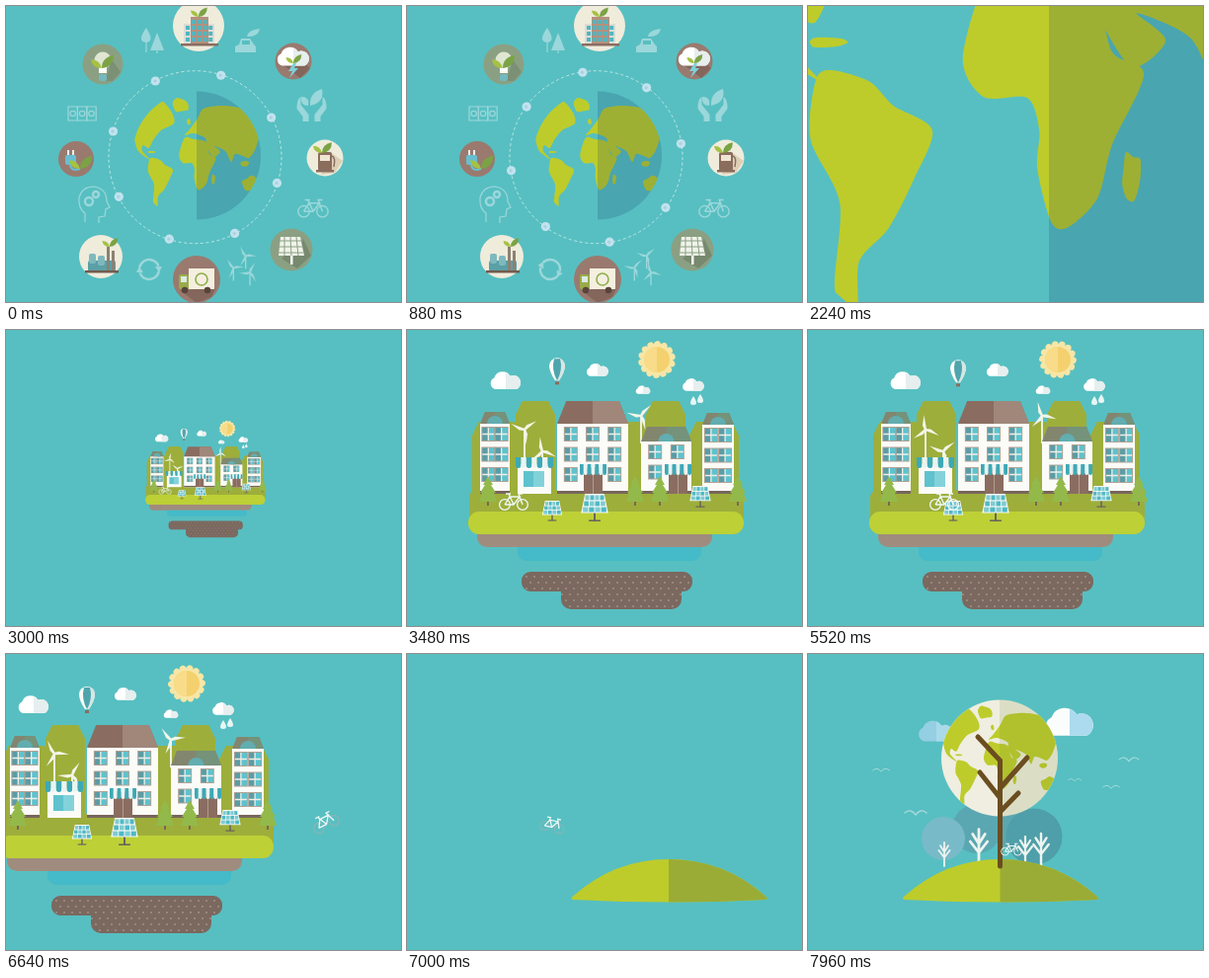
An HTML page with a canvas that plays this animation: 400 px wide and 300 px high, repeating every 8000 ms.

```html
<!DOCTYPE html>
<html lang="en">
<head>
<meta charset="utf-8">
<title>Green planet</title>
<style>
html, body { margin: 0; width: 100%; height: 100%; overflow: hidden; background: #57bfc1; }
canvas { display: block; width: 400px; height: 300px; }
</style>
</head>
<body>
<canvas id="stage" width="400" height="300"></canvas>
<script>
const ctx = document.getElementById('stage').getContext('2d');
const LOOP = 8000, TAU = Math.PI * 2;
const SKY = '#57bfc1', LAND = '#bdcc2b', OLIVE = '#9dae3b', CREAM = '#f0ecdc', WHITE = '#fbfbf8',
  BROWN = '#8a6d60', MAUVE = '#9a7a6f', SAGE = '#8ba083', TEAL = '#4fb6c2', PALE = '#9bd7db', BARK = '#6b4d20';

// ---------- helpers ----------
const clamp = v => Math.max(0, Math.min(1, v));
const span = (t, from, length) => clamp((t - from) / length);
const easeSine = u => (1 - Math.cos(Math.PI * u)) / 2;
const easeCubic = u => u < .5 ? 4 * u ** 3 : 1 - 4 * (1 - u) ** 3;
const easeOut = u => 1 - (1 - u) ** 3;
const noise = n => { const v = Math.sin(n * 12.9898) * 43758.5453; return v - Math.floor(v); };
const times = (n, draw) => { for (let i = 0; i < n; i++) draw(i); };

function fill(d, color) { ctx.fillStyle = color; ctx.fill(new Path2D(d)); }
function line(d, color = PALE, width = 1.2) {
  ctx.strokeStyle = color; ctx.lineWidth = width; ctx.stroke(new Path2D(d));
}
function rect(x, y, w, h, color, radius = 0) {
  ctx.fillStyle = color; ctx.beginPath(); ctx.roundRect(x, y, w, h, radius); ctx.fill();
}
function disc(x, y, r, color, from = 0, to = TAU) {
  ctx.fillStyle = color; ctx.beginPath(); ctx.arc(x, y, r, from, to); ctx.fill();
}
function ring(x, y, r, color = PALE, width = 1.2, from = 0, to = TAU) {
  ctx.strokeStyle = color; ctx.lineWidth = width;
  ctx.beginPath(); ctx.arc(x, y, r, from, to); ctx.stroke();
}
function at(x, y, scale, angle, draw) {
  ctx.save(); ctx.translate(x, y); ctx.rotate(angle); ctx.scale(scale, scale); draw(); ctx.restore();
}
// Scales a scene about a fixed point.
const zoom = (x, y, scale, draw) => at(x, y, scale, 0, () => { ctx.translate(-x, -y); draw(); });

// ---------- globe ----------
// Closed smooth curve through a few key points.
function coast(...p) {
  const n = p.length / 2, shape = new Path2D();
  const get = (i, axis) => p[(i + n) % n * 2 + axis];
  shape.moveTo(p[0], p[1]);
  times(n, i => {
    const c = [0, 1].map(a => [
      get(i, a) + (get(i + 1, a) - get(i - 1, a)) / 7,
      get(i + 1, a) - (get(i + 2, a) - get(i, a)) / 7,
      get(i + 1, a)]);
    shape.bezierCurveTo(c[0][0], c[1][0], c[0][1], c[1][1], c[0][2], c[1][2]);
  });
  return shape;
}
function island(x, y, rx, ry) {
  const p = [];
  times(9, i => {
    const k = .8 + .4 * noise(x + i);
    p.push(x + rx * k * Math.cos(i * TAU / 9), y + ry * k * Math.sin(i * TAU / 9));
  });
  return coast(...p);
}
const america = coast(131, 117, 140, 101, 157, 96, 168, 108, 170, 119, 157, 126, 149, 136, 144.7, 144, 139, 141, 138, 147, 146, 156, 134, 147, 130, 133);
const southAmerica = coast(145, 156, 148, 153.7, 156, 156, 161, 161, 169, 166, 165.3, 176, 160, 186.3, 154, 193, 153.5, 203, 149, 199, 150, 181, 144, 168);
const africa = coast(181, 133.5, 190, 135, 202, 137.5, 206, 150, 212.5, 154.5, 206, 169, 203, 180, 197, 186, 193.5, 185, 190.6, 174, 191, 166, 188.5, 159.4, 179.5, 159.2, 175.3, 151);
const eurasia = coast(181, 131, 186, 125, 194, 114, 200, 104, 218, 101, 238, 104, 252, 117, 256, 132, 252, 146, 246, 154, 240, 152, 232, 150, 228, 158, 222, 147, 211, 142, 217, 147.6, 210, 153, 203, 142, 202, 134, 190, 129);
const continents = [america, southAmerica, africa, eurasia,
  island(177, 100, 8, 7), island(147, 148, 4, 1), island(210, 175.5, 2, 4.7), island(185, 117, 2, 3),
  island(242, 160, 4, 3), island(247, 180, 8, 7)];

function drawGlobe(shade, base) {
  ctx.save();
  ctx.beginPath(); ctx.arc(193, 151.5, 65, 0, TAU); ctx.clip();
  if (base) rect(128, 86, 130, 131, base);
  ctx.fillStyle = LAND;
  continents.forEach(shape => ctx.fill(shape));
  rect(193, 86, 66, 131, shade);
  ctx.restore();
}

// ---------- shared parts ----------
function leaf(x, y, size) {
  at(x, y, size, 0, () => {
    fill('M0 0Q-2 -8 -10 -8Q-9 0 0 0Z', '#a5c244');
    fill('M0 0Q0 -10 11 -12Q11 -1 0 0Z', '#7ba345');
  });
}
function bike(x, y, scale, angle, color = '#eef8f6', wheels = color) {
  at(x, y, scale, angle, () => {
    for (const side of [-9, 9]) ring(side, 3, 5.4, wheels, 1.3);
    line('M-9 3L-4 -5H6L0 3H-9M0 3L-5 -8M-8 -8H-3M9 3L5 -8H9', color, 1.4);
  });
}
function halved(d, left, right, x = 0) {
  fill(d, left);
  ctx.save(); ctx.beginPath(); ctx.rect(x, -300, 400, 600); ctx.clip(); fill(d, right); ctx.restore();
}
function cloud(x, y, s, left = '#fff', right = '#e6eeee') {
  at(x, y, s, 0, () => halved('M-12 9A7 7 0 0 1 -13 -4A10 10 0 0 1 5 -6A8 8 0 0 1 12 9Z', left, right));
}
function turbine(x, y, pole, length, angle, color) {
  rect(x - length / 16, y, length / 8, pole, color);
  times(3, i => at(x, y, length / 13, angle + i * TAU / 3, () => fill('M0 -1L4 -2.2 13 0 0 1Z', color)));
}

// ---------- icons around the globe ----------
function badge(x, y, r, color, draw) {
  at(x, y, 1, 0, () => { disc(0, 0, r, color); draw(); });
}
function badges() {
  badge(195, 20, 26, CREAM, () => {
    rect(-15, -2, 31, 21, '#dcdcd5'); rect(-8, -9, 18, 28, '#b3917d');
    times(4, row => times(5, col => row + col % 4 && rect(-13 + col * 5.8, -6 + row * 6, 4, 4, TEAL)));
    rect(-18, 18, 38, 2.5, BROWN); leaf(0, -9, .8);
  });
  badge(98, 59, 20.5, SAGE, () => {
    fill('M5 10L9 -5 18 8 10 17H0Z', '#7b9074');
    disc(0, -4, 8.5, '#dfe6d2'); rect(-4, 3, 8, 6, WHITE); rect(-4, 10, 8, 7, '#74b9bf', 2); leaf(-1, 4, 1.1);
  });
  badge(291, 56, 18.5, MAUVE, () => {
    fill('M-10 4L12 3 17 7 7 17Z', '#84665c');
    cloud(0, -4, .95); leaf(0, 2, .75);
    fill('M0 2L-5 10H-1L-4 17 5 7H1L3 2Z', '#7ed0d8');
  });
  badge(323, 154, 18.5, CREAM, () => {
    fill('M4 -7L18 3 10 15 -4 17Z', '#ddd0b6');
    rect(-7, -6, 14, 19, '#8b6d5c', 2); rect(-5, -3, 10, 6, '#efe5d2');
    rect(-9, 12, 18, 2.5, BROWN); line('M7 -2Q11 -1 9 9', BROWN, 1.5); leaf(-3, -5, .9);
  });
  badge(289, 247, 21.5, SAGE, () => {
    fill('M-10 9L12 -11 20 6 6 19Z', '#77896f');
    fill('M-11 -13H9L13 6H-13Z', '#f0f3ea');
    times(3, i => line(`M${i * 6 - 7} -13L${i * 7 - 7} 6M-13 ${i * 6 - 9}H12`, '#8ba083', 1));
    rect(-1, 6, 2.5, 9, WHITE);
  });
  badge(193, 277, 24, MAUVE, () => {
    fill('M-17 11L19 9 15 18 0 24Z', '#84665c');
    rect(-18, -5, 10, 15, '#9aac4a', 2); rect(-16, -3, 6, 6, '#dcebe4');
    rect(-8, -11, 26, 21, '#f4efdf'); ring(5, 0, 6, '#8fae4c', 1.6);
    for (const x of [-12, 11]) disc(x, 11, 3.2, '#57443b');
  });
  badge(96, 254, 22, CREAM, () => {
    rect(-13, 4, 28, 11, '#5aa0a6', 2);
    times(2, i => rect(-12 + i * 9, -3 + i * 2, 7, 10, '#7fb9be', 2));
    times(2, i => rect(6 + i * 5, -10 + i * 4, 3, 25 - i * 4, '#8d8173'));
    rect(-16, 14, 34, 2.5, '#735b4e'); leaf(9, -10, .75);
  });
  badge(71, 155, 18, MAUVE, () => {
    rect(-11, -4, 11, 10, '#67bfd0', 2); line('M-8 -4V-9M-3 -4V-9', '#e6f1ef', 2);
    line('M-6 6Q-5 13 4 10', '#67bfd0', 2); leaf(4, 10, 1.1);
  });
}
function outlines(t) {
  fill('M142 22Q132 36 142 37Q151 36 142 22ZM153 27L146 45H160Z', PALE); line('M142 35V47M153 44V48');
  fill('M232 47V41L236 39 238 33H247L251 39 253 41V47ZM244 31Q245 24 257 23Q255 32 244 31Z', PALE);
  rect(239, 35, 8, 4, SKY);
  times(3, i => { line(`M${63 + i * 9.4} 102h9.4v14h-9.4Z`); ring(67.7 + i * 9.4, 109, 2.7); });
  fill('M308 101Q307 88 320 84Q323 98 308 101ZM306 101Q298 101 299 92Q308 92 306 101Z', PALE);
  for (const side of [-1, 1]) {
    ctx.save(); ctx.translate(309.5, 104); ctx.scale(side, 1);
    fill('M3 13V6L11 -4V-12Q15 -10 15 0L9 8V13Z', PALE); ctx.restore();
  }
  bike(311, 205, 1.05, 0, PALE);
  line('M80 219V210Q73 205 74 194Q77 183 89 183Q102 185 102 198L105 204 101 206 100 213 94 214V220');
  ring(84, 198, 4, PALE, 2.4); ring(91, 191, 3, PALE, 2.4);
  times(3, i => {
    const a = -1.3 + i * TAU / 3;
    turbine(240 + 10 * Math.cos(a), 263 + 10 * Math.sin(a), 13, 11, t / 650 + i, PALE);
  });
  times(2, i => at(145, 267, 1, t / 1600 + i * Math.PI, () => {
    ring(0, 0, 10, PALE, 2.4, .2, 2.8); fill('M-13 3H-6L-10 -3Z', PALE);
  }));
}
function globeScene(t) {
  const fade = 1 - span(t, 1720, 360);
  const scale = Math.exp(3.1 * span(t, 1720, 800) ** 1.55);
  zoom(180, 176.3, scale, () => drawGlobe('rgba(8,50,95,.176)'));
  if (!fade) return;
  ctx.globalAlpha = fade;
  ctx.setLineDash([3, 2.6]); ring(191.5, 153.2, 87.5, '#bfe6e7', 1); ctx.setLineDash([]);
  times(8, i => {
    const a = (-72.5 + i * 45 + t * .021) * Math.PI / 180;
    const x = 191.5 + 87 * Math.cos(a), y = 153.2 + 87 * Math.sin(a);
    disc(x, y, 4.6, '#c1e2ee'); disc(x - .5, y, 1.5, '#a5d2e0');
  });
  outlines(t); badges();
  ctx.globalAlpha = 1;
}

// ---------- floating town ----------
function pane(x, y) {
  rect(x - 1, y - 1, 14, 15, '#b0a192');
  rect(x, y, 6, 13, '#5b9ca6'); rect(x + 6, y, 6, 13, '#5cc3ce');
  line(`M${x + 6} ${y}v13M${x} ${y + 6.5}h12`, '#f0eee6', 1.3);
}
function house(x, y, w, cols, rows) {
  rect(x, y, w, 166 - y, WHITE); rect(x, 163, w, 3, '#78655b');
  const step = w / (cols + .25);
  times(rows, r => times(cols, c => pane(x + (w - step * (cols - 1)) / 2 - 6 + c * step, y + 5 + r * 20.5)));
}
function roof(x, y, w, h, left, right, dome) {
  const inset = h / 2.5;
  halved(`M${x} ${y}l${inset} ${-h}h${w - 2 * inset}l${inset} ${h}Z`, left, right, x + w / 2);
  if (dome) disc(x + w / 2, y, 8, '#62adb0', Math.PI, TAU);
}
function awning(x, y, w) {
  times(7, i => rect(x + i * w / 7, y, w / 7, 11, i % 2 ? '#eaf4f2' : '#3da9b6', [0, 0, 3, 3]));
}
function entrance(x) {
  rect(x + 4, 142, 19, 24, BROWN); rect(x + 13, 146, 1, 20, '#b29c8c'); awning(x, 136, 27);
}
function pine(x) {
  rect(x - 1, 172, 2, 6, '#7a6755');
  fill(`M${x} 148l5 9h-2l5 8h-2l3 9h-18l3 -9h-2l5 -8h-2Z`, '#93b94b');
}
function panel(x, y, s) {
  at(x, y, s, 0, () => {
    rect(-1, 18, 2, 10, '#6b625d'); rect(-6, 27, 12, 1.6, '#6b625d');
    fill('M-10 0H10L14 20H-14Z', '#f6f8f5');
    times(3, r => times(4, c => {
      const w = 4.1 + r * .6;
      rect((c - 2) * (w + 1) + .5, 1.5 + r * 6.2, w, 5, (r + c) % 2 ? '#4fb9c5' : '#7fcbd3');
    }));
  });
}
function soil() {
  rect(71, 200, 238, 20, '#a08c7e', [0, 0, 10, 10]);
  rect(112, 220, 186, 14, '#45bac8', [0, 0, 9, 9]);
  ctx.save();
  ctx.beginPath(); ctx.roundRect(116, 245, 173, 20, 9); ctx.roundRect(156, 258, 122, 25, [0, 0, 10, 10]);
  ctx.fillStyle = '#7b685f'; ctx.fill(); ctx.clip();
  times(6, row => times(22, col => disc(121 + col * 8 + row % 2 * 4, 250 + row * 6, 1, '#a19187')));
  ctx.restore();
}
function sun(t) {
  at(253, 30, 1, t / 3000, () => times(14, i => {
    const a = i * TAU / 14;
    disc(15.5 * Math.cos(a), 15.5 * Math.sin(a), 3.4, '#f7e6a6');
  }));
  disc(253, 30, 16, '#f7e6a6'); disc(253, 30, 13, '#f4d16e');
  disc(253, 30, 13, '#f8dc8a', TAU / 4, TAU * 3 / 4);
}
function balloon(t) {
  at(152, 39 - 3 * Math.cos((t - 4240) / 2400 * Math.PI), 1, 0, () => {
    halved('M-2 14Q-8 5 -8 -1A8 8 0 0 1 8 -1Q8 5 2 14Z', WHITE, '#d5e6e4');
    fill('M0 14Q-6 3 -3 -8H3Q6 3 0 14Z', '#4fa5ad');
    rect(-2, 15, 4, 3, BROWN);
  });
}
function town(t) {
  times(6, i => {
    const tall = i % 3 === 1, w = tall ? 40 : 50;
    halved(`M${66 + i * 44} 186V${tall ? 86 : 107}l7 -14h${w - 14}l7 14V186Z`, OLIVE, OLIVE);
  });
  soil();
  rect(63, 162, 278, 36, OLIVE, 8);
  rect(62, 184, 279, 23, '#bdd036', 11);

  const spin = t / 650;
  turbine(119, 101, 30, 15, spin + .3, '#f3f5e8');
  turbine(137, 123, 20, 15, spin + 1.3, '#f3f5e8');
  turbine(237, 87, 28, 15, spin + 2.2, '#f3f5e8');

  house(74, 94, 30, 2, 3); roof(74, 95, 30, 12, '#83866f', '#75927a', true);
  house(152, 94, 72, 3, 3); roof(152, 95, 72, 23, BROWN, '#a0877a');
  house(237, 112, 51, 2, 2); roof(237, 113, 51, 15, '#83866f', '#75927a', true);
  house(299, 95, 32, 2, 3); roof(299, 96, 32, 12, '#83866f', '#75927a', true);
  entrance(175); entrance(261);
  rect(112, 136, 34, 30, WHITE); halved('M118 143H139V159H118Z', '#5fc2cd', '#83d2da', 128);
  awning(110, 129, 38);

  [82, 231, 256, 335].forEach(pine);
  panel(190, 166, .98); panel(147, 173, .72); panel(297, 158, .76);

  const drift = -2 * span(t, 4240, 2400);
  cloud(100 + drift, 52, .9); cloud(193 + drift, 41, .65); cloud(239 + drift, 61, .43); cloud(290, 56, .64);
  times(2, i => {
    at(290 + i * 7, 72 - i * 2, 1, 0, () => fill('M0 -5Q6 4 0 4Q-6 4 0 -5Z', '#e8f5f5'));
  });
  balloon(t); sun(t);
}

// ---------- tree on the hill ----------
function bird(x, y, s) {
  at(x, y, s, 0, () => line('M-11 1Q-5 -4 0 3Q5 -4 11 1', '#a6d9dc', 1.3));
}
function sapling(x, size) {
  at(x, 215, size, 0, () => line('M0 0V-30M-7 -20L0 -11 7 -20M-5 -26L0 -18 5 -26', '#eef4ef', 2.2));
}
function hillScene(t) {
  const grow = easeOut(span(t, 7120, 800)), sway = (7960 - t) / 250;
  ctx.lineCap = 'round';
  ctx.globalAlpha = span(t, 7200, 500);
  bird(74 - sway, 117, .75); bird(109 - sway, 160, 1);
  bird(270 - sway, 127, .6); bird(307 - sway, 134, .75); bird(325 - sway, 106, .9);
  ctx.globalAlpha = 1;
  if (grow) {
    cloud(130 - sway, 79, grow * 1.05, '#94cfe3', '#a9daea');
    cloud(265 + sway, 70, grow * 1.42, '#fbfdfd', '#acdaee');
    disc(171, 177, 25 * grow, '#5aa7b1'); disc(207, 179, 19 * grow, '#5ba7b0');
    disc(229, 185, 28.5 * grow, '#4e9fa9'); disc(137, 187, 22 * grow, '#79bac8');
    sapling(138, .8 * grow); sapling(173, 1.25 * grow); sapling(220, grow); sapling(236, 1.1 * grow);
  }
  halved('M97 246Q139 208 194 208Q251 208 293 246Q296 249 291 249Q194 254 99 249Q94 249 97 246Z',
    LAND, '#9aac35', 194.5);
  if (grow) zoom(194.5, 215, grow, () => {
    at(194, 105.5, 59 / 65, 0, () => { ctx.translate(-193, -151.5); drawGlobe('rgba(110,135,55,.16)', '#efeee0'); });
    line('M194.5 215V108L172 84M194.5 136L222 105M194.5 146L174 120M194.5 160L213 141', BARK, 5);
  });
  ctx.lineCap = 'butt';
}

// ---------- timeline ----------
function ride(t) {
  const x = Math.min(636, 108 + 285 * (Math.max(0, t - 5200) / 1440) ** 1.5);
  const v = span(x, 335, 301), flight = Math.sin(Math.PI * v);
  bike(x, 174 + 24 * v - 15 * flight, 1 - .28 * v, -.5 * Math.sin(TAU * v),
    '#eef8f6', flight > .01 ? '#8db3b7' : '#eef8f6');
}
function draw(t) {
  rect(0, 0, 400, 300, SKY);
  if (t < 2520) return globeScene(t);
  const size = easeSine(span(t, 2680, 700));
  if (!size) return;
  const pan = 430 * easeCubic(span(t, 6243, 1157));
  ctx.save();
  ctx.translate(-pan, 0);
  zoom(202, 154, size, () => {
    if (pan < 350) town(t);
    if (pan > 0) at(430, 0, 1, 0, () => hillScene(t));
    ride(t);
  });
  ctx.restore();
}
function frame(now) {
  draw(now % LOOP);
  requestAnimationFrame(frame);
}
requestAnimationFrame(frame);
</script>
</body>
</html>
```
